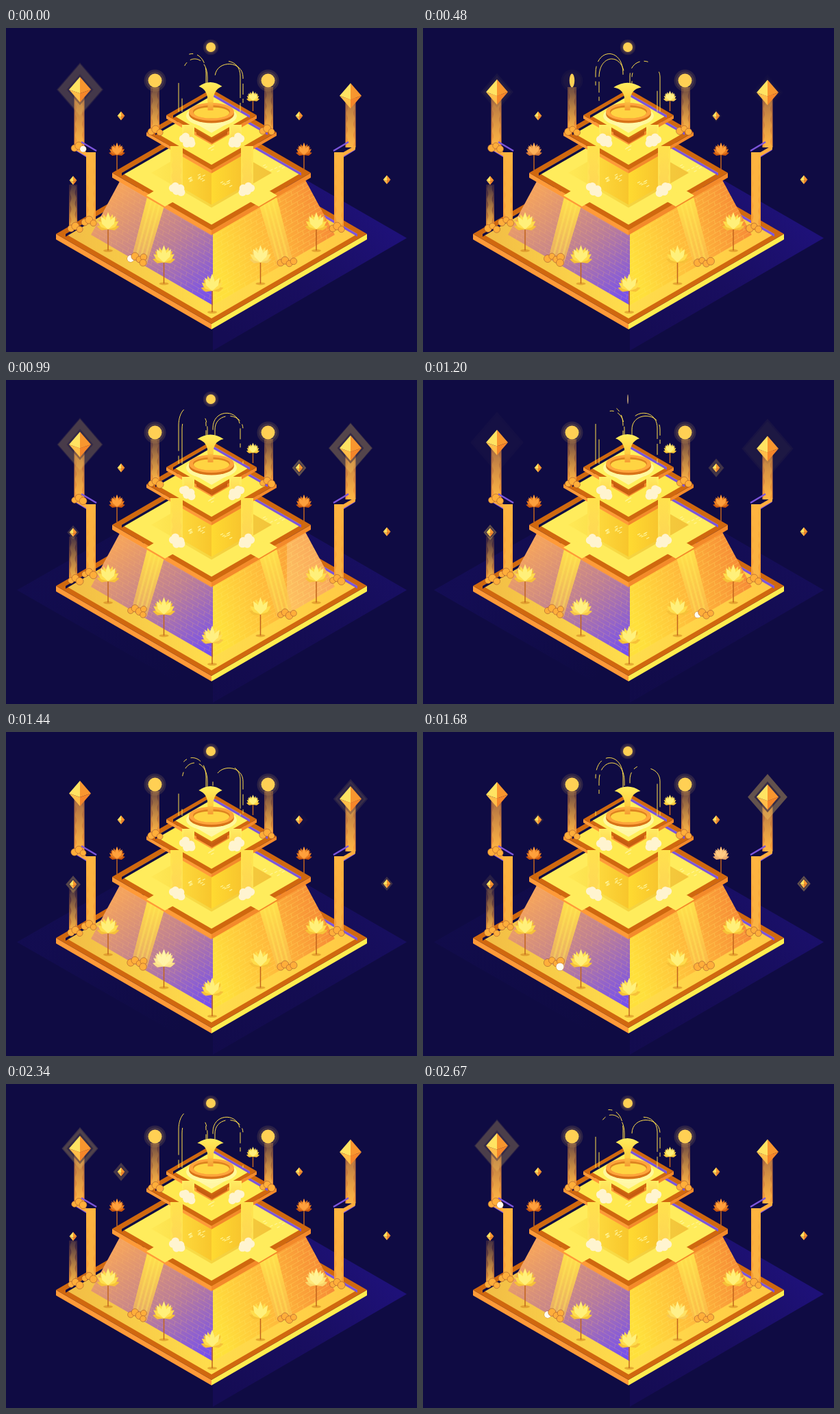
An HTML page with a canvas for the animation above (2700 ms loop, 600 by 472 pixels).

```html
<!DOCTYPE html>
<html lang="en">
<head>
<meta charset="utf-8">
<title>Golden fountain</title>
<style>
html, body { margin: 0; width: 100%; height: 100%; overflow: hidden; background: #0f0b43; }
canvas { display: block; }
</style>
</head>
<body>
<canvas id="stage" width="600" height="472"></canvas>
<script>
const g = document.getElementById('stage').getContext('2d');
const LOOP = 2700, BOB = 1350, TAU = Math.PI * 2, SLOPE = 0.577, AXIS = 300.5;
const NAVY = '#0f0b43', PURPLE = '#7c55dc', DARK = '#d0680f', ORANGE = '#ff9a38', YELLOW = '#ffec5c';

// Triangle peak of height 1 at time c, falling to 0 within w ms, wrapped to the loop.
function bump(t, c, w) {
  const d = Math.abs(((t - c) % LOOP + LOOP * 1.5) % LOOP - LOOP / 2);
  return Math.max(0, 1 - d / w);
}
const bob = (t, phase) => -Math.cos(TAU * (t / BOB - phase));

function seeded(seed) {
  return () => (seed = seed * 16807 % 2147483647) / 2147483647;
}

function poly(fill, ...p) {
  g.beginPath();
  for (let i = 0; i < p.length; i += 2) g.lineTo(p[i], p[i + 1]);
  g.closePath();
  g.fillStyle = fill;
  g.fill();
}
function line(color, width, x0, y0, x1, y1) {
  g.beginPath();
  g.moveTo(x0, y0);
  g.lineTo(x1, y1);
  g.strokeStyle = color;
  g.lineWidth = width;
  g.stroke();
}
function disc(x, y, rx, fill, ry = rx) {
  g.beginPath();
  g.ellipse(x, y, rx, ry, 0, 0, TAU);
  g.fillStyle = fill;
  g.fill();
}
function grad(x0, y0, x1, y1, ...colors) {
  const s = g.createLinearGradient(x0, y0, x1, y1);
  colors.forEach((c, i) => s.addColorStop(i / (colors.length - 1), c));
  return s;
}
const diamond = (x, y, w, h, fill) => poly(fill, x - w, y, x, y - h, x + w, y, x, y + h);
const iso = (x, y, w, fill) => diamond(x, y, w, w * SLOPE, fill);

// Upright face of height h whose top edge runs dx across; rise is -1 (up), 0 or 1 (down).
function face(x, y, dx, rise, h, fill) {
  const y1 = y + rise * Math.abs(dx) * SLOPE;
  poly(fill, x, y, x + dx, y1, x + dx, y1 + h, x, y + h);
}
function mirrored(paint) {
  paint();
  g.save();
  g.translate(2 * AXIS, 0);
  g.scale(-1, 1);
  paint();
  g.restore();
}

function slab(x, y, w, rim, depth, floor, right = '#f48a2a') {
  const inner = w - rim;
  face(x - w, y, w, 1, depth, ORANGE);
  face(x + w, y, -w, 1, depth, right);
  iso(x, y, w, DARK);
  iso(x, y, inner, floor);
  face(x - inner, y, inner, -1, 4, NAVY);
  face(x + inner, y, -inner, -1, 4, PURPLE);
}

function shadows(t) {
  const dim = bump(t, 1250, 750);
  g.globalAlpha = 1 - 0.65 * dim;
  poly(grad(540, 270, 330, 460, '#1e1178', '#190e60', '#150c54'), 302, 143, 585, 306, 302, 470, 302, 306);
  g.globalAlpha = 0.4 * dim;
  poly(grad(70, 290, 250, 440, '#1b1070', NAVY), 302, 143, 16, 306, 302, 470, 302, 306);
  g.globalAlpha = 1;
}

function wall(dir, fill, mortar, t) {
  const at = x => 302 + dir * x, top = 134, foot = 178;
  g.save();
  poly(fill, 302, 297, at(top), 297 - top * SLOPE, at(foot), 404 - foot * SLOPE, 302, 404);
  g.clip();
  for (let row = 0; row < 17; row++) {
    const y = 297 + row * 6.7;
    line(mortar, 0.7, 302, y, at(200), y - 200 * SLOPE);
    for (let x = row % 2 * 8 + 4; x < 190; x += 17) {
      const by = y - x * SLOPE;
      line(mortar, 0.7, at(x), by, at(x + 1.5), by + 6);
    }
  }
  // Band of light crossing both walls
  if (t > 600 && t < 1130) {
    g.fillStyle = 'rgba(255,240,190,.28)';
    g.fillRect(-20 + 1.1 * (t - 600), 200, 142, 210);
  }
  g.restore();
}

function ripples(x, y, w, n) {
  const random = seeded(x);
  for (let i = 0; i < n; i++) {
    const px = x + (random() - 0.5) * w, py = y + (random() - 0.5) * w * 0.5;
    line('#fff59a', 1.1, px, py, px + 4, py - 2);
  }
}

function fall(x, y, w, h, t, top, bottom) {
  g.fillStyle = grad(0, y, 0, y + h, top, bottom);
  g.fillRect(x - w / 2, y, w, h);
  const wave = d => Math.sin((d / 16 - t / 300) * TAU);
  g.beginPath();
  for (let d = 0; d <= h; d += 3) g.lineTo(x - w / 2 + 2.5 + wave(d), y + d);
  for (let d = h; d >= 0; d -= 3) g.lineTo(x + w / 2 - 2.5 + wave(d), y + d);
  g.fillStyle = grad(0, y, 0, y + h, 'rgba(255,205,80,.1)', 'rgba(255,205,80,.5)');
  g.fill();
}

function cloud(x, y, t, phase) {
  for (let i = 0; i < 5; i++) {
    const a = i * TAU / 5 + 0.5, lift = bob(t, phase + i * 0.3);
    disc(x + 6.5 * Math.cos(a), y + 4 * Math.sin(a) + 3 * Math.cos(a) + lift, 5.7, '#fff4d0');
  }
}

// Row of splashing balls; the chosen one lights up at the flash time.
function splash(x, y, count, t, flash, lit = 0) {
  for (let i = 0; i < count; i++) {
    const bx = x + i * 6.3, by = y - i % 2 * 4 + i * 0.6;
    const size = 5 + 0.6 * Math.sin(TAU * t / BOB + i * 2);
    disc(bx, by, size, '#ffae3a');
    g.strokeStyle = 'rgba(150,75,45,.65)';
    g.lineWidth = 0.8;
    g.stroke();
    if (flash !== undefined && i === lit)
      disc(bx, by, size, `rgba(255,253,240,${Math.min(1, 1.6 * bump(t, flash, 150))})`);
  }
}

function lotus(x, y, s, foot, t, flash, tones = ['#f6c138', '#ffdd4c', '#fff07a']) {
  line('#c0641e', 1.5, x, y, x, foot);
  if (s === 1) disc(x, foot, 7, 'rgba(200,110,20,.45)', 2);
  const pale = `rgba(255,246,205,${0.65 * bump(t, flash, 250)})`;
  for (let layer = 0; layer < 3; layer++) {
    const spread = 1.3 - layer * 0.4, petals = 5 - layer;
    for (let i = 0; i < petals; i++) {
      const angle = spread * (2 * i / (petals - 1) - 1);
      const len = s * (25 - 6 * Math.abs(angle)), w = s * 5;
      g.save();
      g.translate(x, y);
      g.rotate(angle);
      for (const fill of [tones[layer], pale])
        poly(fill, 0, 0, w * 0.75, -len * 0.5, w * 0.55, -len * 0.7, 0, -len, -w * 0.55, -len * 0.7, -w * 0.75, -len * 0.5);
      g.restore();
    }
  }
}

function gem(x, y, w, h) {
  const mid = y + h * 0.3;
  poly('#ffe362', x, y - h, x - w, y, x, mid);
  poly('#f8962f', x, y - h, x + w, y, x, mid);
  poly('#ffbd49', x - w, y, x, mid, x, y + h);
  poly('#f5862a', x + w, y, x, mid, x, y + h);
}
function pulse(t, start, length, x, y, w, h) {
  const p = ((t - start + LOOP) % LOOP) / length;
  if (p >= 1) return;
  const a = Math.sin(Math.PI * p), k = 1.1 + 1.4 * p;
  const ring = (s, color) => diamond(x, y, w * s, h * s, color);
  ring(k, `rgba(255,205,90,${0.13 * a})`);
  ring(0.7 + k * 0.62, `rgba(255,215,100,${0.25 * a * a})`);
  ring(1.22, `rgba(15,11,67,${0.55 * a * a})`);
}
function coin(x, y, r, t, flip) {
  const turn = bump(t, flip, 210), width = Math.max(1, r * Math.cos(turn * TAU / 4));
  for (const halo of [1.6, 1.3]) disc(x, y, r * halo, `rgba(255,195,90,${0.12 * (1 - turn)})`);
  disc(x, y, width, turn > 0.85 ? '#a98e70' : '#ffd054', r);
}

function jet(t, from, to, bend, apex, phase) {
  g.setLineDash([62, 7, 16, 6, 6, 48]);
  g.lineDashOffset = -145 * (t / BOB + phase);
  g.strokeStyle = '#ffdf4c';
  g.lineWidth = 1;
  g.stroke(new Path2D(`M${from} 82V${bend}C${from} ${apex} ${to} ${apex} ${to} ${bend}V122`));
  g.setLineDash([]);
}

function fountain(t) {
  disc(300, 128, 37, 'rgba(255,250,170,.8)', 16);
  disc(300, 125, 33, '#d87318', 13.5);
  disc(300, 122, 33, '#ffa53b', 13);
  disc(300, 122, 27, '#dd8420', 9.5);
  disc(300, 123.5, 26, '#ffd442', 8);
  const m = 0.5 + bob(t, 0) / 2, w = 17 + 4 * m, y = 85 + 2 * m;
  g.fillStyle = grad(0, 95, 0, 121, '#ffe34d', '#f59831');
  g.fillRect(294.5, 96, 8, 24);
  g.beginPath();
  g.moveTo(294.5, 108);
  g.quadraticCurveTo(295, 90 - m, 298.5 - w, y);
  g.quadraticCurveTo(298.5, 73, 298.5 + w, y);
  g.quadraticCurveTo(302, 90 - m, 302.5, 108);
  g.fillStyle = grad(0, 79, 0, 108, '#ffee5d', '#ffcb3c');
  g.fill();
}

function tiers(t) {
  slab(300, 300, 227, 14, 8, grad(90, 0, 510, 0, '#f2bd45', '#ffdd4c', '#ffc944'), '#ffed4f');
  wall(-1, grad(165, 240, 285, 405, '#f3a25f', '#bd7f96', '#744ff0'), 'rgba(255,190,110,.32)', t);
  wall(1, grad(302, 330, 465, 270, '#ffe03c', '#ffb93c', '#f78d37'), 'rgba(255,238,110,.4)', t);

  // Water sliding down the walls
  mirrored(() => {
    poly(grad(215, 245, 195, 345, '#ffe34a', 'rgba(250,190,80,.6)'), 207, 243, 232, 256, 205, 346, 183, 336);
    for (let i = 0; i < 3; i++)
      line('rgba(255,235,90,.35)', 3, 213 + i * 6, 248 + i * 3, 189 + i * 6, 338 + i * 3);
  });

  slab(300, 211, 145, 14, 7, YELLOW);
  iso(300, 211, 88, grad(212, 0, 388, 0, '#ffe956', '#f6d540', '#f3c33a'));
  face(240, 174, 60, 1, 49, grad(240, 0, 300, 0, '#ffdf42', '#f8c62c'));
  face(360, 174, -60, 1, 49, grad(300, 0, 360, 0, '#ffda31', '#f5bd2c'));
  ripples(278, 219, 24, 12);
  ripples(322, 227, 18, 7);
  ripples(390, 204, 30, 7);
  mirrored(() => poly(YELLOW, 205, 244, 222, 234, 250, 250, 232, 260));

  slab(300, 152, 95, 13, 5, '#ffe94f');
  mirrored(() => fall(249, 172, 18, 60, t, '#ffe44c', 'rgba(255,226,90,.9)'));
  ripples(301, 176, 12, 4);

  slab(300, 127, 66, 10, 5, '#fff05c');
  iso(300, 140, 22, '#fff6a4');
  mirrored(() => {
    face(278, 149, 22.5, 1, 6, '#c65d11');
    fall(266, 141, 18, 22, t, '#ffef66', '#ffe453');
  });
}

// Column that steps sideways over a purple ledge.
function ledge(x, dir, bottom, t) {
  fall(x, 96, 15, 78, t, 'rgba(225,135,65,.65)', '#ff9f39');
  line(PURPLE, 2.5, x + dir * 3, 166, x + dir * 25, 179);
  line(PURPLE, 2.5, x - dir * 6, 177, x + dir * 12, 188);
  face(x - dir * 7, 171, dir * 24, 1, 6, '#ffad3d');
  fall(x + dir * 17, 181, 14, bottom - 181, t, '#ffb33e', '#f69a35');
}

function pillars(t) {
  mirrored(() => fall(217.5, 86, 13, 64, t, 'rgba(200,125,60,.4)', '#ff9f39'));
  fall(98, 228, 12, 62, t, 'rgba(150,90,60,.25)', '#f69a35');
  ledge(107, 1, 283, t);
  ledge(503, -1, 294, t);
  splash(212, 151, 3, t);
  splash(375, 150, 3, t);
  splash(100, 175, 3, t, 2690, 2);
  splash(115, 283, 3, t);
  splash(95, 292, 3, t);
  splash(182, 336, 4, t, 20);
  splash(200, 342, 1, t, 1680);
  splash(401, 342, 4, t, 1200);
  splash(477, 292, 3, t);
  mirrored(() => {
    cloud(265, 164, t, 0.2);
    cloud(250, 235, t, 0.8);
  });
}

function lotuses(t) {
  for (const x of [162, 435])
    lotus(x, 185, 0.72, 207, t, x * 4, ['#c9560f', '#e57a20', '#ffa03c']);
  for (const i of [-2, 2, -1, 1, 0]) {
    const x = 301 + i * (65 + 5.5 * Math.abs(i)), foot = 414 - 0.59 * Math.abs(x - 301);
    lotus(x, foot - 31, 1, foot, t, 780 - 630 * i);
  }
}

function ornaments(t) {
  const leftY = 92.5 + 3 * bob(t, 0.06), rightY = 97 + 3 * bob(t, 0.35);
  for (const [x, y, start] of [[108, leftY, 370], [108, leftY, 2060], [503, rightY, 420], [503, rightY, 1250]])
    pulse(t, start, 870, x, y, 16, 18.5);
  gem(108, leftY, 16, 18.5);
  gem(503, rightY, 16, 18.5);
  for (const [x, y, start] of [[428, 128, 350], [98, 222, 700], [556, 221, 1150], [168, 128, 1500]]) {
    pulse(t, start, 1150, x, y, 5.5, 6.5);
    gem(x, y, 5.5, 6.5);
  }
  coin(217.5, 76.5, 10, t, 430);
  coin(382.5, 76.5, 10, t, 2150);
  coin(299, 28, 7, t, 1200);
}

function draw(t) {
  g.fillStyle = NAVY;
  g.fillRect(0, 0, 600, 472);
  shadows(t);
  tiers(t);
  lotus(360.5, 106, 0.58, 121, t, 300);
  pillars(t);
  jet(t, 292, 252, 66, 28, 0.74);
  jet(t, 294, 257, 72, 36, 0.78);
  jet(t, 302, 342, 70, 41, 0.33);
  jet(t, 305, 346, 72, 46, 0.09);
  fountain(t);
  lotuses(t);
  ornaments(t);
}

function frame() {
  draw(performance.now() % LOOP);
  requestAnimationFrame(frame);
}
frame();
</script>
</body>
</html>
```
